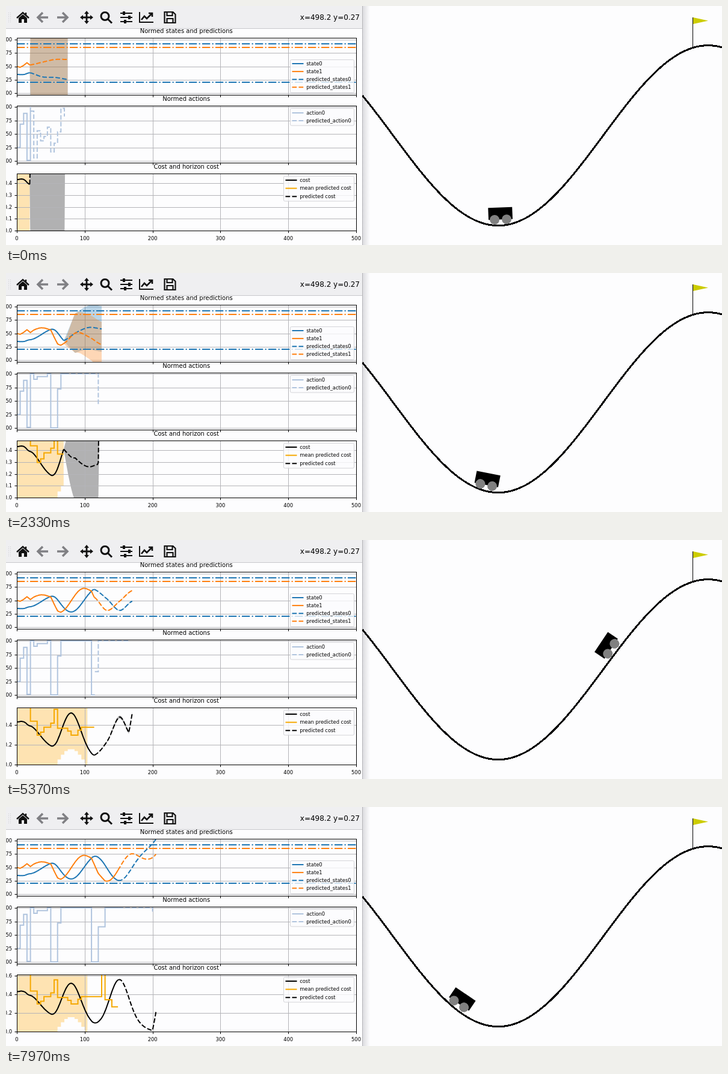
Write an HTML page that moves like this. It is 1190 px wide and 398 px high and loops after 8000 ms.

```html
<!DOCTYPE html>
<html lang="en">
<head>
<meta charset="utf-8">
<title>Mountain car control</title>
<style>
html, body { margin: 0; width: 100%; height: 100%; overflow: hidden; background: #fdfdfe; }
svg { display: block; width: 1190px; height: 398px; font-family: "DejaVu Sans", sans-serif; }
</style>
</head>
<body>
<svg id="stage" viewBox="0 0 1190 398"></svg>
<script>
const LOOP = 8000, HORIZON = 56;
const LEFT = 18, RIGHT = 582, UNIT = 1.128;
const COLOR = {
  state0: '#1f77b4', state1: '#ff7f0e', action: '#b0c4de', cost: '#000', mean: '#f5a800',
  grid: '#b4b4b8', paper: '#fdfdfe'
};
const DASH = '7.7 3.3', DASHDOT = '13.3 3.3 2.1 3.3';

// Time in ms and the simulation step reached by then.
const pace = [[0, 19.7], [1500, 54.7], [3100, 86.5], [4330, 104], [5370, 118], [6870, 139.3], [8000, 151.4]];

// Held levels: each lasts from its step until the next one.
const actionLevels = [[0, .25], [5, .68], [10, .88], [15, .01], [20, 1], [25, .9], [30, .95], [45, 1], [50, 0],
  [60, .72], [65, 1], [110, 0], [120, .65], [130, 1]];
const meanLevels = [[0, 1], [20, .44], [30, .3], [35, .33], [40, .38], [50, .42], [55, .56], [60, .37],
  [75, .34], [80, .3], [90, .35], [95, .38], [125, 1], [130, .345], [140, .27]];
const held = (levels, step) => levels.findLast(l => l[0] <= step)[1];
const action = step => held(actionLevels, step);
const meanCost = step => held(meanLevels, step);
const meanCostLow = step => step > 55 && step < 100 ? .16 * Math.sin(Math.PI * (step - 55) / 45) : 0;
const noise = i => { const v = Math.sin(12.9898 * (i + 1)) * 43758.5453; return v - Math.floor(v); };

// Plans made at step n: both states at thirds of the horizon, the spread reached and how fast, and the actions.
const plans = [
  { n: 15, s0: [.306, .295, .26], s1: [.58, .63, .63], spread: 1.06, rise: .03, act: noise },
  { n: 50, s0: [.585, .565, .52], s1: [.33, .23, .215], spread: .67, rise: .3, act: i => i < 6 ? 0 : .1 },
  { n: 80, s0: [.45, .66, .65], s1: [.7, .64, .37], spread: .18, rise: .8, act: i => i < 10 ? 1 : .42 },
  { n: 95, s0: [.575, .46, .43], s1: [.46, .43, .485], spread: .32, rise: .35, act: i => i < 9 ? 1 : .45 },
  { n: 110, s0: [.53, .315, .485], s1: [.315, .485, .685], spread: .011, rise: .5, act: i => i ? 1 : .43 },
  { n: 130, spread: 0, rise: 1, act: i => i < 10 ? 1 : .9 }
];

// Mountain car dynamics; both states are normed to 0..1.
const actual = { s0: [], s1: [] };
for (let i = 0, pos = -.568, vel = 0; i <= 210; i++) {
  actual.s0.push((pos + 1.2) / 1.8);
  actual.s1.push((vel + .07) / .14);
  vel += .0015 * (2 * action(i) - 1) - .0025 * Math.cos(3 * pos);
  pos += vel;
}
const costOf = (s0, spread = 0) => .012 + (1 - s0) ** 2 + .6 * spread ** 2;

const lerp = (a, b, w) => a + (b - a) * w;
const px = step => LEFT + UNIT * step;
const stateY = v => 145.3 - 89.3 * v;
const actionY = v => 258 - 90 * v;
const stateAt = (name, step) => {
  const i = Math.floor(step);
  return lerp(actual[name][i], actual[name][i + 1], step - i);
};

function sample(list, pos) {
  const i = Math.min(list.length - 2, Math.floor(pos)), u = pos - i;
  const p1 = list[i], p2 = list[i + 1], p0 = list[i - 1] ?? p1, p3 = list[i + 2] ?? p2;
  return p1 + u / 2 * (p2 - p0 + u * (2 * p0 - 5 * p1 + 4 * p2 - p3 + u * (3 * (p1 - p2) + p3 - p0)));
}

const stage = document.getElementById('stage');
function el(tag, attrs, parent = stage, text) {
  const node = document.createElementNS('http://www.w3.org/2000/svg', tag);
  for (const key in attrs) node.setAttribute(key, attrs[key]);
  if (text !== undefined) node.textContent = text;
  return parent.appendChild(node);
}
const label = (x, y, text, size = 8.33, anchor = 'start', parent = stage) =>
  el('text', { x, y, 'font-size': size, 'text-anchor': anchor }, parent, text);
const rule = (d, stroke, width = 1, parent = stage, dash = 'none') =>
  el('path', { d, stroke, fill: 'none', 'stroke-width': width, 'stroke-dasharray': dash }, parent);
const fill = (color, opacity, parent) => el('path', { fill: color, 'fill-opacity': opacity }, parent);

const join = points => points.map(p => p[0].toFixed(1) + ' ' + p[1].toFixed(1)).join('L');
const line = points => 'M' + join(points);
const band = (upper, lower) => line([...upper, ...lower.slice().reverse()]) + 'Z';
function stairs(valueAt, start, end, toY) {
  const points = [];
  for (let s = start; s <= end; s += 5)
    points.push([px(s), toY(valueAt(s))], [px(Math.min(s + 5, end)), toY(valueAt(s))]);
  return points;
}

function buildPanel(top, title) {
  const bottom = top + 95, id = 'clip' + Math.floor(top);
  el('rect', { x: LEFT, y: top, width: RIGHT - LEFT, height: 95 }, el('clipPath', { id }));
  const layer = () => el('g', { 'clip-path': `url(#${id})` });
  const back = layer(), grid = el('g', {}), plot = layer();
  for (let i = 0; i <= 5; i++) {
    const x = Math.round(px(100 * i)) + .5;
    if (i % 5) rule(`M${x} ${top}V${bottom}`, COLOR.grid, 1, grid);
    rule(`M${x} ${bottom}v3.5`, '#000', 1, grid);
  }
  el('rect', { x: LEFT + .5, y: top, width: RIGHT - LEFT, height: 95, fill: 'none', stroke: '#000' });
  label(299.7, top - 8.5, title, 10, 'middle');
  return { back, grid, plot };
}
function addTick(panel, y, text = '') {
  const g = el('g', { transform: `translate(0 ${y})` }, panel.grid);
  rule(`M${LEFT} 0H${RIGHT}`, COLOR.grid, 1, g);
  rule('M14.5 0h3.5', '#000', 1, g);
  return { g, text: label(10, 2.8, text, 8.33, 'end', g) };
}
function unitTicks(panel, toY) {
  for (let v = 0; v <= 1; v += .25) addTick(panel, Math.round(toY(v)) + .5, v.toFixed(2));
}
function legend(x, y, height, first, gap, rows) {
  el('rect', { x, y, width: 578.5 - x, height, rx: 2, fill: COLOR.paper, 'fill-opacity': .8, stroke: '#d4d4d8' });
  rows.forEach(([text, color, dash], i) => {
    const rowY = first + gap * i;
    rule(`M${x + 3} ${rowY}h19`, color, 2, stage, dash);
    label(x + 26.7, rowY + 2.8, text);
  });
}

// Toolbar
el('rect', { width: 592, height: 37, fill: '#efeff1' });
rule('M0 37.5H592', '#c8c8cc');
rule('M4.5 11V28M7.5 11V28', '#ccccd0', 1, stage, '1 2');
const icon = (x, d, color = '#111', width = 3) => {
  const node = rule(d, color, width);
  node.setAttribute('transform', `translate(${x} 19)`);
  return node;
};
const solid = (x, d) => icon(x, d, 'none').setAttribute('fill', '#111');
icon(28, 'M-10 1L0-8L10 1M5-8V-3', '#111', 2.4);
solid(28, 'M-7 1L0-5L7 1V9H2V3H-2V9H-7Z');
icon(61, 'M9 0H-7M0-8L-8 0L0 8', '#808084', 3.6);
icon(94, 'M-9 0H7M0-8L8 0L0 8', '#808084', 3.6);
icon(134, 'M-8 0H8M0-8V8', '#111', 2.8);
solid(134, 'M-11 0l5-4v8ZM11 0l-5-4v8ZM0-11l-4 5h8ZM0 11l-4-5h8Z');
icon(166, 'M-8-2a6.5 6.5 0 1 0 13 0a6.5 6.5 0 1 0-13 0M3.5 3L10 9.5');
icon(200, 'M-10-7H10M-10 0H10M-10 7H10', '#111', 2);
icon(200, 'M-4-10V-4M5-3V3M-2 4V10', '#111', 4);
icon(233, 'M-11-9V8H12', '#111', 2);
icon(233, 'M-8 4L-3-2L1 2L9-6M4-7H10V-1', '#111', 2.6);
icon(272.5, 'M-9-9H5L9-5V9H-9ZM-5-8V-3H4V-8M-5 8V2H5V8', '#111', 2.2);
label(588, 23, 'x=498.2 y=0.27', 12, 'end');

// State panel
const states = buildPanel(53.5, 'Normed states and predictions');
unitTicks(states, stateY);
const band0 = fill(COLOR.state0, .3, states.plot), band1 = fill(COLOR.state1, .3, states.plot);
for (const [y, color] of [[63, COLOR.state0], [127, COLOR.state0], [69, COLOR.state1]])
  rule(`M${LEFT} ${y}H${RIGHT}`, color, 2, states.plot, DASHDOT);
const past0 = rule('', COLOR.state0, 2, states.plot), past1 = rule('', COLOR.state1, 2, states.plot);
const plan0 = rule('', COLOR.state0, 2, states.plot, DASH), plan1 = rule('', COLOR.state1, 2, states.plot, DASH);
legend(472.5, 89.5, 55, 96, 13.1, [['state0', COLOR.state0], ['state1', COLOR.state1],
  ['predicted_states0', COLOR.state0, DASH], ['predicted_states1', COLOR.state1, DASH]]);

// Action panel
const acts = buildPanel(166.5, 'Normed actions');
unitTicks(acts, actionY);
const pastAction = rule('', COLOR.action, 2, acts.plot), planAction = rule('', COLOR.action, 2, acts.plot, DASH);
legend(472.5, 170.5, 28.5, 178, 13.1, [['action0', COLOR.action], ['predicted_action0', COLOR.action, DASH]]);

// Cost panel
const costs = buildPanel(279.5, 'Cost and horizon cost');
const meanBand = fill('#ffa500', .3, costs.back), costBand = fill('#000', .3, costs.back);
const costTicks = [0, 1, 2, 3, 4].map(() => addTick(costs, 0));
const pastCost = rule('', COLOR.cost, 2, costs.plot), meanLine = rule('', COLOR.mean, 2, costs.plot);
const planCost = rule('', COLOR.cost, 2, costs.plot, DASH);
legend(461.5, 283.5, 41.5, 290, 13.6,
  [['cost', COLOR.cost], ['mean predicted cost', COLOR.mean], ['predicted cost', COLOR.cost, DASH]]);
for (let v = 0; v <= 500; v += 100) label(px(v), 390, v, 8.33, 'middle');

// Hill, flag and car
const shade = el('linearGradient', { id: 'shade' });
el('stop', { offset: 0, 'stop-color': '#dcdce0' }, shade);
el('stop', { offset: 1, 'stop-color': COLOR.paper }, shade);
el('rect', { x: 593, width: 12, height: 398, fill: 'url(#shade)' });
rule('M592.5 0V398', '#b4b4b8');
const SCALE = 1000 / 3;
const hillX = pos => 592.5 + (pos + 1.2) * SCALE;
const hillY = pos => 399 - (Math.sin(3 * pos) * .45 + .55) * SCALE;
const hillPoints = Array.from({ length: 151 }, (_, i) => i * .012 - 1.2).map(p => [hillX(p), hillY(p)]);
rule(line(hillPoints), '#000', 3).setAttribute('shape-rendering', 'crispEdges');
rule('M1141.5 19V68.5', '#000');
el('path', { d: 'M1142 19L1167 24.5L1142 30Z', fill: '#cccc00' });
const car = el('g', {});
el('rect', { x: -20, y: -30, width: 40, height: 20 }, car);
for (const cx of [-10, 10]) el('circle', { cx, cy: -10, r: 8, fill: '#808080' }, car);

function stepAt(t) {
  const i = pace.findIndex(p => p[0] > t), [t0, a] = pace[i - 1], [t1, b] = pace[i];
  return lerp(a, b, (t - t0) / (t1 - t0));
}

// Blends the two plans around step n; f runs from 0 to 1 over the horizon.
function makePlan(n) {
  const i = Math.min(plans.length - 2, plans.findLastIndex(p => p.n <= n));
  const a = plans[i], b = plans[i + 1], w = Math.min(1, (n - a.n) / (b.n - a.n)), head = n + 4;
  const shape = (p, name, f) => p[name]
    ? sample([actual[name][head], ...p[name]], f * 3)
    : stateAt(name, head + HORIZON * f);
  const state = (name, f) => lerp(shape(a, name, f), shape(b, name, f), w);
  const width = (p, f) => p.spread * Math.min(1, f / p.rise);
  const spread = f => lerp(width(a, f), width(b, f), w);
  const terminal = f => (.2 + 4 * spread(f)) * Math.max(0, f - .91) / .09;
  return {
    act: (w < .5 ? a : b).act, state, spread,
    cost: f => costOf(state('s0', f), spread(f)) + terminal(f),
    costSpread: f => 2 * (1 - state('s0', f)) * spread(f)
  };
}

function drawPlots(n) {
  const head = n + 4, plan = makePlan(n);
  const past = Array.from({ length: head + 1 }, (_, i) => i);
  const ahead = Array.from({ length: HORIZON + 1 }, (_, i) => i / HORIZON);
  const set = (node, d) => node.setAttribute('d', d);
  const costAt = i => costOf(actual.s0[i]);
  const top = 1.1 * Math.max(...past.map(costAt));
  const costY = v => 374.5 - 95 * v / top;

  function trace([pastNode, planNode, bandNode], toY, pastValue, value, spread) {
    set(pastNode, line(past.map(i => [px(i), toY(pastValue(i))])));
    const edge = sign => ahead.map(f => [px(head + HORIZON * f), toY(value(f) + sign * spread(f))]);
    set(planNode, line(edge(0)));
    set(bandNode, band(edge(1), edge(-1)));
  }
  trace([past0, plan0, band0], stateY, i => actual.s0[i], f => plan.state('s0', f), plan.spread);
  trace([past1, plan1, band1], stateY, i => actual.s1[i], f => plan.state('s1', f), plan.spread);
  trace([pastCost, planCost, costBand], costY, costAt, plan.cost, plan.costSpread);

  set(pastAction, line(stairs(action, 0, n + 5, actionY)));
  set(planAction, line(stairs(s => plan.act((s - n) / 5 - 1), n + 5, n + 55, actionY)));
  set(meanLine, line(stairs(meanCost, 0, head, costY)));
  const end = Math.min(head, 104);
  set(meanBand, band([[px(0), 279], [px(end), 279]], stairs(meanCostLow, 0, end, costY)));

  const gap = top < .5 ? .1 : .2;
  costTicks.forEach(({ g, text }, i) => {
    g.setAttribute('visibility', i * gap <= top ? 'visible' : 'hidden');
    g.setAttribute('transform', `translate(0 ${Math.floor(costY(i * gap)) + .5})`);
    text.textContent = (i * gap).toFixed(1);
  });
}

let drawn;
function frame() {
  const step = stepAt(performance.now() % LOOP);
  const pos = stateAt('s0', step) * 1.8 - 1.2;
  const tilt = -Math.cos(3 * pos) * 180 / Math.PI;
  car.setAttribute('transform', `translate(${hillX(pos)} ${hillY(pos)}) rotate(${tilt})`);
  // The plots trail the car and refresh once per five steps.
  const n = 5 * Math.floor((step - 4.5) / 5);
  if (n !== drawn) drawPlots(drawn = n);
  requestAnimationFrame(frame);
}
frame();
</script>
</body>
</html>
```
